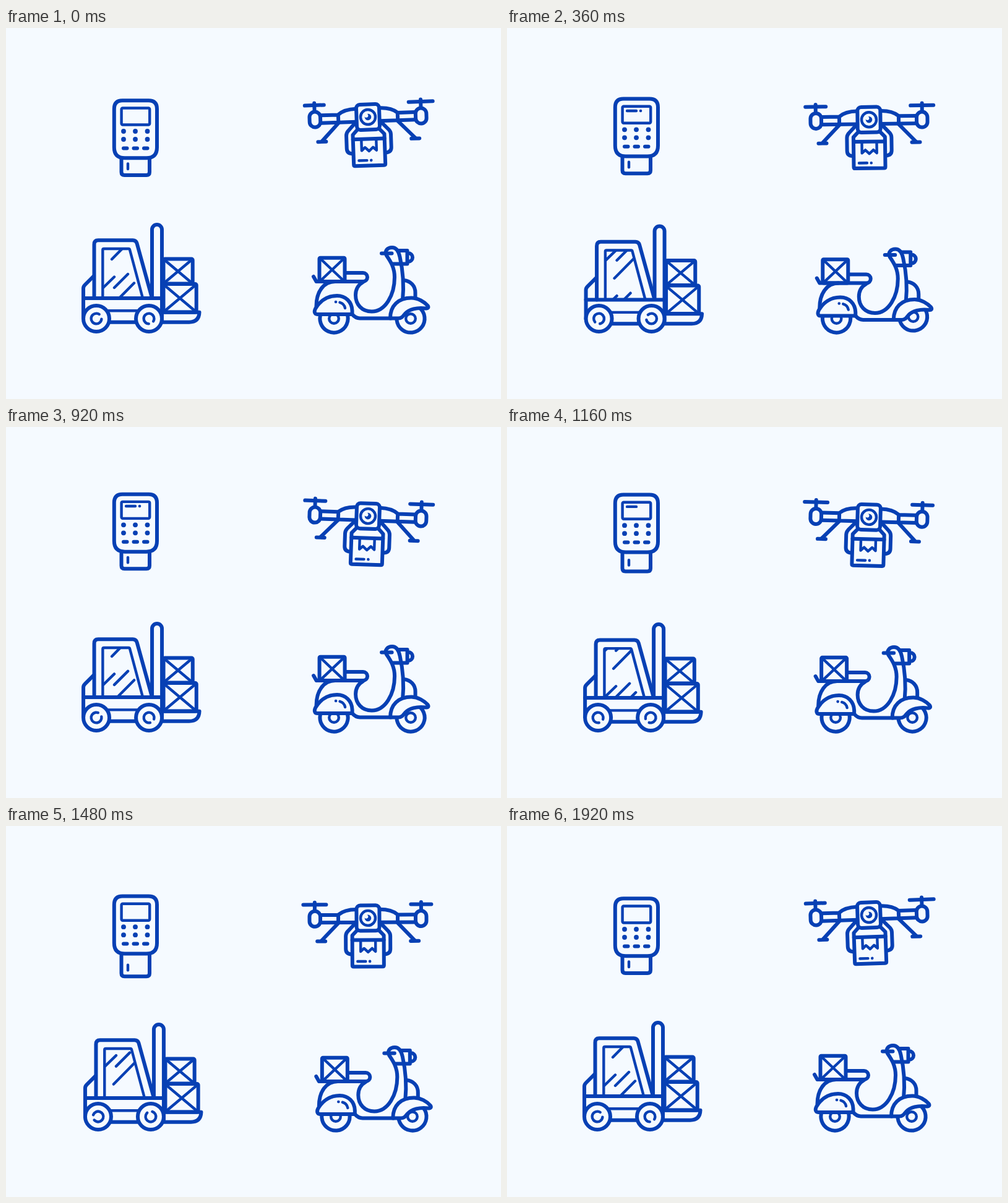
An HTML page that plays this animation: 800 by 600 pixels, repeating every 1.96 s.

```html
<!DOCTYPE html>
<html lang="en">
<head>
<meta charset="utf-8">
<title>Delivery icons</title>
<style>
  :root { --ink: #0740b4; --paper: #f5faff; }
  html, body { margin: 0; width: 100%; height: 100%; overflow: hidden; background: var(--paper); }
  svg { display: block; width: 100vw; height: 100vh; }
  .art { fill: none; stroke: var(--ink); stroke-width: 6; stroke-linecap: round; stroke-linejoin: round; }
  .thin { stroke-width: 4.4; }
  .solid { fill: var(--paper); }
  .dot { fill: var(--ink); stroke: none; }
  .glint { fill: var(--paper); stroke: none; }
</style>
</head>
<body>
<svg viewBox="0 0 800 600">
  <defs>
    <clipPath id="pane"><path d="M156 438V357H199.500L221.500 438Z"/></clipPath>
    <g id="stripes">
      <path d="M157 420L175 402.500M175 420L197 398M171 449L207 412.500"/>
    </g>
    <g id="arm">
      <path d="M-19 -14Q-38 -14 -48 -5.500V7M-76 -5.300H-48M-76 7H-19"/>
      <rect x="-94.500" y="-11.500" width="17.500" height="25" rx="8.700"/>
      <path d="M-86 -13V-25.500M-48 8L-76 37M-82 37.300H-69"/>
      <path d="M-22 10L-33 21.500Q-36 25 -36 29V50Q-36 58 -27 58.500"/>
    </g>
  </defs>

  <!-- card terminal -->
  <g class="art">
    <g id="card">
      <path d="M186.500 200V233Q186.500 238 191.500 238H227Q232 238 232 233V200"/>
      <path class="thin" d="M197 219.500V228"/>
    </g>
    <g id="terminal">
      <path class="solid" d="M188 117.300H230.500Q244 117.300 244 131V193Q244 210.300 227 210.300H192Q174.800 210.300 174.800 193V131Q174.800 117.300 188 117.300Z"/>
      <rect class="thin" x="186.600" y="129.500" width="45.600" height="27" rx="2"/>
      <g id="readout">
        <path class="thin" d="M194 136.700H209"/>
        <circle id="cursor" class="dot" cx="216" cy="136.700" r="2.300"/>
      </g>
      <g class="dot">
        <circle cx="190" cy="167" r="3.900"/><circle cx="209" cy="167" r="3.900"/><circle cx="228.500" cy="167" r="3.900"/>
        <circle cx="190" cy="180" r="3.900"/><circle cx="209" cy="180" r="3.900"/><circle cx="228.500" cy="180" r="3.900"/>
      </g>
      <path d="M190 194.400H195.500M206.500 194.400H212M223 194.400H228.500"/>
    </g>
  </g>

  <!-- drone, drawn around its camera -->
  <g class="art" id="drone">
    <use href="#arm"/>
    <use href="#arm" transform="scale(-1 1)"/>
    <path id="propL"/>
    <path id="propR"/>
    <path class="solid" d="M-17 19L-25.500 28V76.500Q-25.500 78.500 -23.500 78.500H23.500Q25.500 78.500 25.500 76.500V28L17 19"/>
    <path d="M-25.500 35.500H25.500"/>
    <path class="thin" d="M-12 36V54L-6.500 49L0 55L6.500 49L12 54V36M-17 70H-4"/>
    <circle class="dot" cx="2.800" cy="70" r="2.300"/>
    <rect class="solid" x="-18.500" y="-20.500" width="37" height="41" rx="6"/>
    <circle class="thin" r="12"/>
    <circle class="dot" r="5.300"/>
    <circle class="glint" cx="-2.600" cy="-2.300" r="3"/>
  </g>

  <!-- forklift -->
  <g class="art">
    <g id="truck">
      <path d="M125 468V421Q125 418 127.500 415.500L142 401"/>
      <path d="M142.500 437V350Q142.500 343.300 149 343.300H205Q210 343.300 211.500 348L235.500 435"/>
      <path class="thin" d="M156.300 437V359Q156.300 357 158.300 357H198Q199.600 357 200 358.500L221 437"/>
      <g clip-path="url(#pane)">
        <g id="shine" class="thin">
          <use href="#stripes"/><use href="#stripes" y="-75"/><use href="#stripes" y="-150"/>
        </g>
      </g>
      <path d="M125 437H252M236 436V326A8 8 0 0 1 252 326V472M165 475.700H212"/>
      <path class="thin" d="M164 457.300H213"/>
      <path d="M254 459.700H312.500Q312 475.700 296 475.700H250"/>
      <g id="crateTop">
        <rect x="254.500" y="373.500" width="47.200" height="40" rx="2"/>
        <path class="thin" d="M256 375L300 412M300 375L256 412"/>
      </g>
      <g id="crateLow">
        <rect x="254.500" y="414" width="53.200" height="45.500" rx="2"/>
        <path class="thin" d="M256 416L306 458M306 416L256 458"/>
      </g>
    </g>
    <g id="truckRear"><circle class="solid" r="21"/><circle class="thin" r="8.400" pathLength="360" stroke-dasharray="300 60"/></g>
    <g id="truckFront"><circle class="solid" r="21"/><circle class="thin" r="8.400" pathLength="360" stroke-dasharray="300 60"/></g>
  </g>

  <!-- scooter -->
  <g class="art">
    <g id="bikeRear"><circle r="22.600" pathLength="360"/><circle class="thin" r="7.800"/></g>
    <g id="bikeFront"><circle r="22.600" pathLength="360"/><circle class="thin" r="7.800"/></g>
    <g id="scooter">
      <path d="M501.500 450C501.500 427 513 410 532 410"/>
      <path d="M497 402L501.500 410H577A7 7 0 0 0 577 396H549"/>
      <path d="M643 408C654 409 661.500 417 661.500 428V437"/>
      <path d="M577 411C568 416 565 424 565 432C565 447 575 458.500 591 458.500C613 458.500 628 432 628 403C628 388 622 378 615 368C611 360 617 355 624 355C632 355 635 363 636.500 370C641 390 643.500 415 641 440"/>
      <path d="M607 364.500H623.500M634 360H648.500V381.500H625M650 364A7 7 0 0 1 650 378"/>
      <path d="M559.500 463Q565 469.500 572 469.500H622"/>
      <path class="solid" d="M621 469.500C621 449 634 436.500 655 436.500C666 436.500 676 443 681.500 449C683.500 452 682 453.800 679 453.500C664 451.500 651 455 645 462C641 467 639 469.500 634 469.500Z"/>
      <path class="solid" d="M503 463H559.500V457C559 443 549 433 535 433C519 433 507 442 500 454C497.500 459 499 463 503 463Z"/>
      <circle class="dot" cx="533" cy="443" r="2.300"/>
      <path class="thin" d="M539.500 443.800Q546.500 445.500 548 453"/>
      <g id="parcel">
        <rect x="506.500" y="371.700" width="41" height="38.300" rx="1.500"/>
        <path class="thin" d="M508 373L546 409M546 373L508 409"/>
      </g>
    </g>
  </g>
</svg>
<script>
  const LOOP = 1960, TICK = 40, CYCLE = 960;
  const $ = id => document.getElementById(id);
  const place = (id, transform) => $(id).setAttribute('transform', transform);
  const move = (id, x, y) => place(id, `translate(${x} ${y})`);

  // smooth 0 - 1 - 0 over a period
  const wave = (t, period) => (1 - Math.cos(2 * Math.PI * t / period)) / 2;
  // a single wave between two times
  const hump = (t, from, to) => t > from && t < to ? wave(t - from, to - from) : 0;
  const clamp = v => Math.max(0, Math.min(1, v));

  function drawTerminal(t) {
    const y = -8.7 * wave(t, 2 * CYCLE);
    move('terminal', 0, y);
    move('card', 0, y + 9.2 * hump(t, CYCLE, 2 * CYCLE));
    $('readout').setAttribute('opacity', Math.min(clamp((t - 160) / 160), clamp((1480 - t) / 200)));
    $('cursor').setAttribute('opacity', Math.floor(t / 240) % 2);
  }

  function drawDrone(t) {
    const tilt = -2 * Math.cos(Math.PI * t / CYCLE);
    place('drone', `translate(585 ${144 + 5 * wave(t, CYCLE)}) rotate(${tilt})`);
    const spin = 4 * Math.abs((t / 160 + 1) % 2 - 1);
    const blade = (id, x, half) => $(id).setAttribute('d', `M${x - half} -22H${x + half}`);
    blade('propL', -86, 15.5 + spin);
    blade('propR', 86, 19.5 - spin);
  }

  function hop(id, amount, x, y, lift, turn) {
    place(id, `translate(0 ${-lift * amount}) rotate(${turn * amount} ${x} ${y})`);
  }

  function drawForklift(t, sway) {
    const d = 3 * sway, turn = t / CYCLE * 360;
    move('truck', d, d);
    move('shine', 0, 75 * (t % CYCLE) / CYCLE);
    const wheel = (id, x, bump, gap) => {
      move(id, x + d, 470 - bump);
      $(id).lastElementChild.setAttribute('transform', `rotate(${gap + 30 + turn})`);
    };
    wheel('truckRear', 146, 2.2 * hump(t, 1560, 1760), -26);
    wheel('truckFront', 231, 2 * hump(t, 1480, 1700), 62);
    const jolt = hump(t, 1530, 1760);
    hop('crateTop', jolt, 278, 393.5, 7.6, 3);
    hop('crateLow', jolt, 281, 437, 4, -2);
  }

  function drawScooter(t, sway) {
    move('scooter', 4.4 * sway, 3 * sway);
    const gap = 27 * hump(t, 480, 960);
    const wheel = (id, x, bump, angle) => {
      move(id, x + 3 * sway, 470 - bump);
      const tyre = $(id).firstElementChild;
      tyre.setAttribute('stroke-dasharray', gap > 0 ? `${360 - gap} ${gap}` : 'none');
      tyre.setAttribute('transform', `rotate(${angle + gap / 2 + (t - 680) * 360 / CYCLE})`);
    };
    wheel('bikeRear', 530, 3 * hump(t, 470, 670), 55);
    wheel('bikeFront', 654, 3 * hump(t, 260, 460), 113);
    hop('parcel', hump(t, 560, 800), 527, 391, 6, 6);
  }

  function render(now) {
    const t = Math.floor(now % LOOP / TICK) * TICK;
    const sway = wave(t, CYCLE);
    drawTerminal(t);
    drawDrone(t);
    drawForklift(t, sway);
    drawScooter(t, sway);
  }

  let start;
  function frame(now) {
    start ??= now;
    render(now - start);
    requestAnimationFrame(frame);
  }
  render(0);
  requestAnimationFrame(frame);
</script>
</body>
</html>
```
